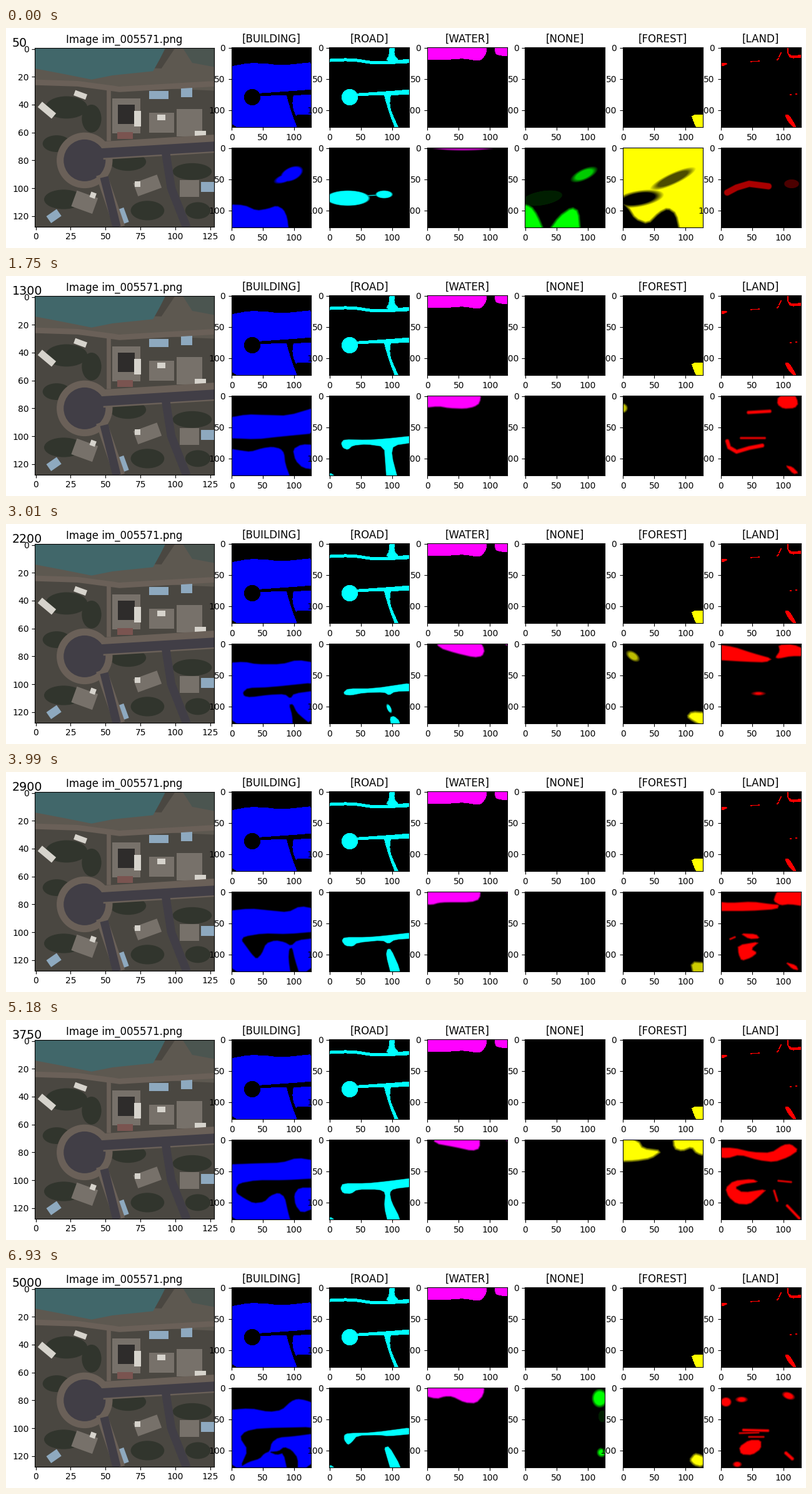
Animation, 1280 px wide and 353 px high, one loop 7 s. Source, as a matplotlib script:

```python
import numpy as np
import matplotlib.pyplot as plt
from matplotlib.animation import FuncAnimation
from matplotlib.patches import Circle, Ellipse, Polygon, Rectangle
from matplotlib.path import Path

W, H, DPI = 1280, 353, 100
FRAMES, INTERVAL = 100, 70
N, LIMIT = 128, 12
# class: (colour, edge softness in cells)
CLASSES = {
    "BUILDING": ((0, 0, 1), 2.5),
    "ROAD": ((0, 1, 1), 1.5),
    "WATER": ((1, 0, 1), 3),
    "NONE": ((0, 1, 0), 5),
    "FOREST": ((1, 1, 0), 5),
    "LAND": ((1, 0, 0), 3),
}
Y, X = np.mgrid[0:N, 0:N] + 0.5
CELLS = np.column_stack([X.ravel(), Y.ravel()])


# Shape fields: positive inside, in cells from the edge.
def distance(pts):
    best = np.full((N, N), 1e9)
    for (ax, ay), (bx, by) in zip(pts[:-1], pts[1:]):
        dx, dy = bx - ax, by - ay
        t = np.clip(((X - ax) * dx + (Y - ay) * dy) / (dx * dx + dy * dy + 1e-9), 0, 1)
        best = np.minimum(best, (X - ax - t * dx) ** 2 + (Y - ay - t * dy) ** 2)
    return np.sqrt(best)


def poly(*xy):
    pts = np.array(xy, float).reshape(-1, 2)
    pts = np.where(pts <= 0, -9, np.where(pts >= N, N + 9, pts))
    nxt = np.roll(pts, -1, axis=0)
    pts = np.stack([0.8 * pts + 0.2 * nxt, 0.2 * pts + 0.8 * nxt], 1).reshape(-1, 2)
    pts = np.vstack([pts, pts[:1]])
    inside = Path(pts).contains_points(CELLS).reshape(N, N)
    return np.where(inside, 1, -1) * distance(pts)


def below(*xy):
    return poly(*xy, N, N, 0, N)


def stroke(half, *xy):
    return half - distance(np.array(xy, float).reshape(-1, 2))


def oval(cx, cy, rx, ry, tilt=0):
    c, s = np.cos(np.radians(tilt)), np.sin(np.radians(tilt))
    u, v = (X - cx) * c + (Y - cy) * s, (Y - cy) * c - (X - cx) * s
    return (1 - np.hypot(u / rx, v / ry)) * min(rx, ry)


def join(*parts):
    return np.maximum.reduce(parts)


def cut(base, *holes):
    return np.minimum.reduce([base] + [-h for h in holes])


def dim(field, cap):
    return np.minimum(field, cap)


EMPTY = np.full((N, N), -float(LIMIT))
CORNER = poly(0, 124, 7, 125, 9, 128, 0, 128)

# Ground truth
loop_road = join(oval(33, 80, 13, 13),
                 poly(40, 74, 85, 71, 128, 67, 128, 76, 85, 77, 40, 78),
                 poly(87, 74, 92, 92, 97, 108, 108, 128, 115, 128, 100, 104, 97, 92, 99, 74))
TRUTH = {
    "BUILDING": cut(below(0, 32, 28, 25, 55, 26, 80, 29, 128, 23), loop_road,
                    poly(97, 108, 128, 108, 128, 128, 108, 128)),
    "ROAD": join(loop_road,
                 poly(0, 19, 35, 17, 75, 23, 128, 18, 128, 25, 75, 28, 35, 22, 0, 24),
                 poly(97, 0, 106, 0, 104, 12, 112, 21, 90, 22, 96, 12)),
    "WATER": join(poly(0, 0, 96, 0, 95, 10, 86, 21, 75, 21, 60, 18, 30, 20, 0, 20),
                  poly(107, 0, 128, 0, 128, 15, 113, 13, 108, 8)),
    "NONE": EMPTY,
    "FOREST": poly(109, 108, 128, 108, 128, 128, 122, 128, 113, 120),
    "LAND": join(poly(0, 24, 12, 25, 5, 30, 0, 32), stroke(0.7, 47, 23, 62, 22),
                 stroke(1, 96, 9, 93, 15), stroke(1, 90, 20, 92, 18),
                 stroke(1, 107, 0, 107, 9), poly(106, 8, 114, 14, 128, 10, 128, 16, 110, 18),
                 stroke(0.7, 110, 76, 113, 76), stroke(0.7, 119, 75, 122, 75),
                 poly(102, 108, 109, 108, 117, 121, 125, 128, 114, 126, 106, 118)),
}

KEYS = {}


def key(step, **fields):
    KEYS[step] = {c: np.clip(fields.get(c, EMPTY), -LIMIT, LIMIT) for c in CLASSES}


hills = below(0, 91, 20, 92, 40, 101, 58, 98, 72, 93, 83, 99, 89, 112, 92, 128)
key(0,
    BUILDING=join(oval(96, 42, 18, 10, -25), oval(85, 49, 16, 6, -20), hills),
    ROAD=join(oval(30, 81, 34, 12), oval(88, 75, 13, 6), stroke(0.6, 60, 77, 80, 76)),
    WATER=dim(oval(57, 0, 40, 4), 0.5),
    NONE=join(dim(oval(95, 43, 18, 7, -25), 1.5), dim(oval(28, 81, 26, 9, -10), -1.9),
              poly(0, 89, 10, 94, 20, 108, 32, 128, 0, 128),
              poly(36, 128, 55, 110, 75, 96, 86, 102, 89, 128)),
    FOREST=cut(np.full((N, N), 12.0), oval(25, 82, 34, 11, -10),
               dim(oval(80, 50, 30, 7, -25), 1),
               poly(0, 80, 8, 95, 20, 114, 40, 122, 58, 104, 72, 97, 85, 106, 92, 128, 0, 128)),
    LAND=join(dim(stroke(4.5, 10, 72, 25, 64, 45, 58, 76, 62), 0.5),
              dim(oval(113, 58, 10, 6), -0.6)))

key(12,
    BUILDING=cut(below(0, 35, 25, 34, 50, 36, 80, 40, 90, 33, 102, 25, 112, 28, 128, 38),
                 poly(8, 75, 20, 70, 45, 69, 70, 64, 128, 60, 128, 74, 102, 82, 97, 95, 99, 115,
                      106, 128, 92, 128, 87, 110, 86, 85, 75, 80, 55, 86, 35, 90, 20, 85)),
    ROAD=poly(19, 76, 25, 69, 45, 69, 75, 68, 105, 66, 128, 58, 128, 71, 105, 77, 101, 85,
              102, 100, 116, 126, 116, 128, 104, 128, 96, 112, 93, 95, 90, 83, 75, 79,
              45, 81, 35, 88, 24, 86),
    WATER=join(poly(7, 0, 8, 9, 20, 15, 40, 24, 80, 25, 97, 22, 102, 14, 97, 4, 92, 0),
               poly(114, 0, 128, 0, 128, 7)),
    FOREST=oval(0, 18, 9, 11),
    LAND=join(oval(68, 30, 22, 5.5), oval(72, 31, 18, 5),
              poly(91, 0, 124, 0, 117, 12, 127, 25, 128, 37, 115, 33, 100, 20, 93, 8),
              stroke(2, 40, 67, 63, 65), stroke(2, 95, 66, 118, 62),
              stroke(2.5, 50, 86, 60, 81, 75, 79, 88, 84, 90, 92), oval(56, 85, 9, 4, -25),
              poly(104, 107, 112, 111, 125, 126, 116, 124)))

key(25,
    BUILDING=join(poly(0, 36, 25, 30, 55, 31, 90, 32, 128, 18, 128, 60, 75, 66, 40, 70, 0, 68),
                  below(0, 84, 15, 88, 30, 90, 50, 84, 65, 82, 78, 85, 84, 92, 86, 110, 96, 128),
                  poly(98, 86, 112, 78, 128, 79, 128, 119, 114, 116, 102, 104)),
    ROAD=join(poly(19, 76, 24, 70, 60, 71, 90, 69, 128, 64, 128, 75, 103, 80, 100, 95,
                   111, 128, 92, 128, 90, 110, 88, 82, 60, 78, 38, 80, 30, 87, 22, 84), CORNER),
    WATER=join(poly(0, 0, 87, 0, 84, 12, 75, 18, 60, 21, 35, 20, 18, 17, 0, 20),
               poly(110, 0, 128, 0, 128, 5)),
    FOREST=dim(oval(0, 20, 6, 6), 1.2),
    LAND=join(poly(91, 2, 115, 0, 124, 12, 118, 20, 100, 21, 90, 14),
              stroke(2.5, 44, 27, 78, 25), stroke(3, 10, 73, 13, 83, 25, 90, 45, 84, 66, 80),
              stroke(1.5, 32, 68, 70, 68), poly(103, 112, 114, 114, 124, 124, 116, 126)))

key(43,
    BUILDING=cut(below(0, 31, 20, 29, 40, 33, 80, 33, 105, 26, 128, 31),
                 poly(18, 78, 26, 71, 60, 70, 128, 62, 128, 75, 100, 80, 94, 88, 85, 81,
                      60, 82, 30, 86, 20, 84),
                 poly(92, 98, 98, 97, 104, 110, 115, 120, 128, 128, 98, 128, 97, 115)),
    ROAD=join(poly(23, 78, 30, 72, 70, 72, 128, 62, 128, 76, 105, 77, 96, 83, 88, 78,
                   55, 79, 35, 83, 25, 82),
              oval(96, 104, 7, 3, 65), poly(97, 118, 104, 116, 113, 124, 113, 128, 100, 128)),
    WATER=join(poly(9, 0, 82, 0, 92, 10, 88, 20, 75, 22, 45, 15, 20, 7),
               poly(108, 0, 128, 0, 128, 8)),
    FOREST=join(dim(oval(16, 20, 9, 5, 35), 1.2),
                poly(103, 117, 110, 109, 128, 111, 128, 128, 112, 124)),
    LAND=join(poly(0, 1, 20, 5, 50, 15, 82, 24, 72, 30, 40, 29, 0, 26),
              poly(92, 2, 115, 1, 128, 10, 128, 20, 112, 20, 92, 24, 87, 22, 94, 12),
              oval(60, 80, 8, 2.5)))

key(57,
    BUILDING=cut(below(0, 31, 30, 27, 60, 30, 90, 33, 110, 23, 128, 28),
                 poly(16, 78, 20, 72, 50, 67, 90, 68, 128, 64, 128, 74, 105, 78, 95, 87, 85, 81,
                      70, 78, 55, 83, 48, 100, 40, 108, 32, 100, 22, 86),
                 poly(92, 92, 97, 90, 101, 108, 110, 128, 95, 128, 91, 108)),
    ROAD=join(poly(20, 79, 24, 73, 60, 73, 85, 71, 128, 65, 128, 75, 105, 77, 95, 84,
                   85, 78, 45, 82, 38, 88, 26, 87),
              poly(93, 92, 99, 92, 113, 123, 113, 128, 100, 128, 91, 102)),
    WATER=join(poly(0, 0, 86, 0, 84, 12, 70, 17, 30, 17, 18, 18, 8, 21, 0, 20),
               dim(poly(114, 0, 128, 0, 128, 9), 0)),
    FOREST=dim(poly(109, 113, 128, 115, 128, 128, 114, 128), 1.5),
    LAND=join(poly(0, 16, 15, 18, 50, 16, 80, 20, 93, 21, 90, 28, 45, 31, 0, 31),
              poly(87, 5, 95, 0, 128, 0, 128, 24, 110, 20, 95, 22, 84, 15),
              stroke(1.2, 15, 76, 22, 73), poly(31, 67, 56, 68, 62, 75, 45, 76),
              poly(27, 86, 62, 80, 48, 92, 58, 98, 48, 106, 33, 111, 28, 100),
              poly(103, 113, 120, 118, 124, 126, 114, 124)))

key(74,
    BUILDING=cut(below(0, 40, 40, 38, 80, 37, 105, 29, 128, 34),
                 poly(7, 78, 12, 70, 40, 65, 85, 65, 128, 62, 128, 77, 108, 77, 100, 88, 102, 105,
                      112, 118, 128, 108, 128, 128, 96, 128, 90, 115, 85, 92, 75, 85, 62, 90,
                      52, 100, 35, 102, 20, 94, 8, 86)),
    ROAD=join(poly(18, 78, 22, 70, 60, 70, 90, 67, 128, 61, 128, 75, 103, 79, 97, 85, 100, 100,
                   113, 125, 113, 128, 95, 128, 88, 108, 90, 85, 80, 80, 45, 80, 35, 87, 22, 86),
              CORNER),
    WATER=join(poly(9, 0, 84, 0, 84, 14, 72, 18, 45, 12, 12, 6),
               poly(108, 0, 128, 0, 128, 7)),
    FOREST=join(poly(0, 0, 25, 2, 32, 14, 62, 18, 45, 30, 20, 34, 0, 35),
                poly(80, 0, 128, 0, 128, 27, 118, 22, 110, 12, 95, 18, 82, 14)),
    LAND=join(poly(0, 13, 20, 13, 50, 20, 80, 21, 100, 8, 112, 7, 124, 17, 108, 28, 85, 36,
                   60, 33, 30, 24, 10, 30, 0, 27),
              poly(7, 78, 20, 66, 50, 63, 60, 68, 35, 71, 22, 77, 35, 85, 74, 79, 60, 92,
                   45, 104, 25, 103, 12, 92),
              stroke(1.5, 85, 82, 90, 98), stroke(1.3, 92, 66, 112, 68),
              stroke(2, 106, 106, 125, 126)))

key(99,
    BUILDING=cut(below(0, 36, 30, 33, 60, 39, 80, 36, 95, 22, 105, 18, 118, 20, 128, 27),
                 poly(13, 80, 22, 70, 45, 65, 128, 63, 128, 73, 100, 78, 75, 80, 64, 88, 61, 102,
                      52, 106, 45, 114, 28, 119, 14, 127, 26, 100),
                 poly(60, 103, 75, 102, 84, 95, 96, 100, 106, 113, 106, 128, 90, 128, 83, 105,
                      72, 108)),
    ROAD=join(poly(24, 76, 30, 73, 70, 72, 128, 63, 128, 74, 95, 78, 80, 76, 45, 77, 36, 88,
                   30, 92, 24, 84),
              poly(88, 96, 96, 94, 114, 125, 114, 128, 100, 128, 92, 110), CORNER),
    WATER=join(poly(0, 0, 92, 0, 90, 12, 78, 25, 60, 24, 40, 14, 28, 14, 15, 18, 0, 12),
               poly(112, 0, 128, 0, 128, 8)),
    NONE=join(oval(120, 17, 11, 13), oval(123, 104, 6, 6), dim(oval(124, 46, 4, 6), -1.9)),
    FOREST=poly(107, 116, 115, 106, 124, 108, 128, 116, 126, 127, 114, 124),
    LAND=join(oval(8, 23, 8, 7), oval(33, 19, 8, 4), oval(108, 13, 9, 5, 20),
              stroke(2, 36, 68, 75, 69), stroke(1.2, 30, 73, 60, 72), stroke(1.2, 45, 79, 68, 79),
              poly(29, 95, 45, 84, 64, 84, 64, 98, 50, 108, 32, 107),
              stroke(2.5, 104, 105, 114, 114), oval(26, 123, 6, 4)))

STEPS = np.array(sorted(KEYS))


def paint(level, name):
    return level[..., None] * np.array(CLASSES[name][0], float)


def predict(i):
    k = min(np.searchsorted(STEPS, i, "right") - 1, len(STEPS) - 2)
    a, b = STEPS[k], STEPS[k + 1]
    t = (i - a) / (b - a)
    amp = 1.5 * min(1, np.abs(STEPS - i).min() / 3)
    rng = np.random.default_rng(i)
    out = {}
    for name, (_, soft) in CLASSES.items():
        fx, fy, px, py = rng.uniform([0.06, 0.06, 0, 0], [0.14, 0.14, 6.3, 6.3])
        field = (1 - t) * KEYS[a][name] + t * KEYS[b][name]
        field = field + amp * np.sin(X * fx + px) * np.sin(Y * fy + py)
        out[name] = paint(np.clip(0.5 + field / soft, 0, 1), name)
    return out


plt.rcParams["font.family"] = "DejaVu Sans"
fig = plt.figure(figsize=(W / DPI, H / DPI), dpi=DPI, facecolor="white")


def panel(x, y, size, xticks, yticks, title=None):
    ax = fig.add_axes([x / W, 1 - (y + size) / H, size / W, size / H])
    ax.set(xlim=(-0.5, N - 0.5), ylim=(N - 0.5, -0.5), xticks=xticks, yticks=yticks)
    if title:
        ax.set_title(title)
    return ax


def show(ax, rgb):
    return ax.imshow(rgb, extent=(-0.5, N - 0.5, N - 0.5, -0.5), aspect="auto",
                     interpolation="nearest")


def draw_photo(ax):
    def area(color, *xy):
        ax.add_patch(Polygon(np.reshape(xy, (-1, 2)), color=color, lw=0))

    def lane(color, width, *xy):
        pts = np.reshape(xy, (-1, 2))
        ax.plot(pts[:, 0], pts[:, 1], color=color, lw=width * 1.61, solid_capstyle="butt")

    def roof(color, x, y, w, h, turn=0):
        ax.add_patch(Rectangle((x - w / 2, y - h / 2), w, h, angle=turn,
                               rotation_point="center", color=color, lw=0))

    soil, path, asphalt, green = "#4a4741", "#6a6058", "#413e46", "#31352d"
    ax.set_facecolor(soil)
    area("#5d5850", -1, 12, 90, 14, 100, -1, 128, -1, 128, 30, 60, 27, -1, 25)
    area("#41676a", -1, -1, 93, -1, 89, 7, 84, 16, 55, 19, 40, 22, 20, 18, -1, 14)
    area("#4b5550", 105, -1, 128, -1, 128, 13, 112, 10)
    for x, y, w, h in [(22, 42, 30, 16), (40, 50, 14, 20), (15, 68, 20, 12), (66, 81, 26, 13),
                       (112, 88, 28, 12), (20, 108, 28, 14), (80, 116, 24, 14), (116, 116, 18, 12)]:
        ax.add_patch(Ellipse((x, y), w, h, color=green, lw=0))
    lane(path, 4, -1, 24, 30, 25, 60, 29, 128, 25)
    lane(path, 3, 52, 29, 52, 66)
    lane(path, 13, 48, 73, 128, 68)
    ax.add_patch(Circle((35, 80), 20, color=path, lw=0))
    lane(path, 8, 47, 90, 60, 128)
    lane(asphalt, 6, 49, 92, 58, 128)
    lane(asphalt, 6, 93, 74, 97, 100, 108, 128)
    lane(asphalt, 7, 45, 75, 128, 70)
    ax.add_patch(Circle((35, 80), 15, color=asphalt, lw=0))
    for x, y, w, h, turn in [(65, 48, 20, 25, 0), (90, 53, 18, 14, 0), (110, 53, 18, 20, 0),
                             (35, 110, 16, 12, 20), (80, 98, 18, 10, -20), (110, 100, 14, 12, 0)]:
        roof("#77716a", x, y, w, h, turn)
    roof("#2e2c2b", 65, 47, 12, 14)
    roof("#7a5450", 64, 62, 11, 5)
    for x, y, w, h, turn in [(73, 50, 5, 11, 0), (8, 44, 13, 5, 40), (32, 33, 9, 4, 20),
                             (118, 61, 8, 4, 0), (73, 97, 4, 4, 0), (41, 105, 4, 4, 20),
                             (90, 49, 6, 4, 0)]:
        roof("#d6d3cc", x, y, w, h, turn)
    for x, y, w, h, turn in [(88, 33, 14, 6, 0), (108, 31, 8, 7, 0), (62, 120, 6, 11, -20),
                             (13, 120, 9, 6, -35), (123, 99, 9, 7, 0)]:
        roof("#8ea9bf", x, y, w, h, turn)


draw_photo(panel(46.4, 32.4, 286.2, range(0, N, 25), range(0, N, 20), "Image im_005571.png"))

ticks = (0, 50, 100)
lefts = 360.5 + 156.6 * np.arange(len(CLASSES))
for name, x in zip(CLASSES, lefts):
    show(panel(x, 31.4, 128, ticks, ticks, f"[{name}]"), paint((TRUTH[name] > 0) * 1.0, name))
first = predict(0)
images = {name: show(panel(x, 192, 128, ticks, ticks), first[name])
          for name, x in zip(CLASSES, lefts)}
counter = fig.text(10 / W, 1 - 30 / H, "50", fontsize=13.7, va="baseline")


def update(i):
    for name, rgb in predict(i).items():
        images[name].set_data(rgb)
    counter.set_text(str(50 * (i + 1)))
    return [*images.values(), counter]


anim = FuncAnimation(fig, update, frames=FRAMES, interval=INTERVAL, repeat=True, repeat_delay=0)
plt.show()
```
